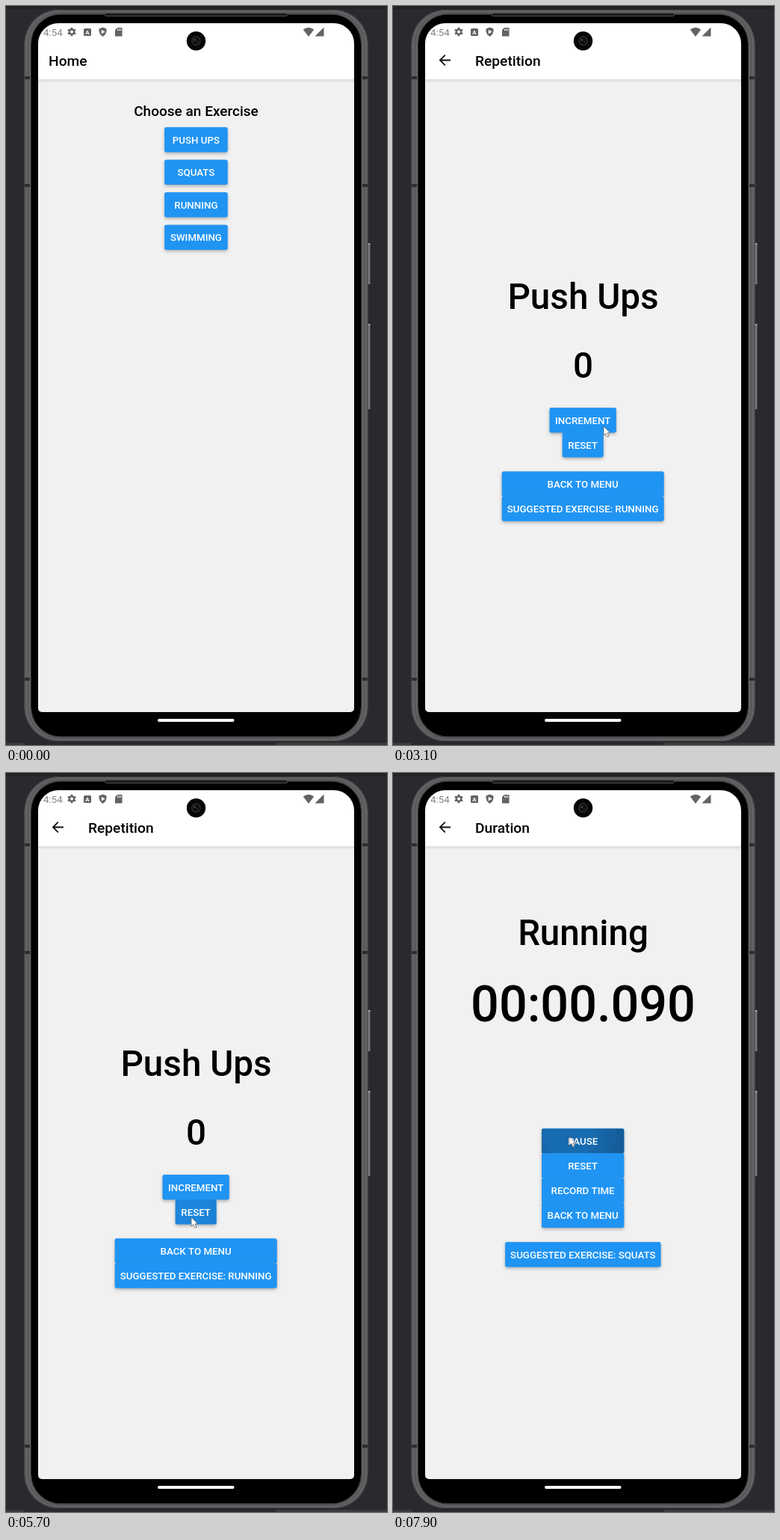
An HTML page with a canvas for the animation above (8000 ms loop, 510 px wide and 988 px high).

```html
<!DOCTYPE html>
<html lang="en">
<head>
<meta charset="utf-8">
<title>Exercise app</title>
<style>
html, body { margin: 0; width: 100%; height: 100%; overflow: hidden; background: #292a2d; }
canvas { display: block; width: 510px; height: 988px; }
</style>
</head>
<body>
<canvas id="stage" width="510" height="988"></canvas>
<script>
const ctx = document.getElementById('stage').getContext('2d');
const LOOP = 8000, STEP = 100, SLIDE = 450, MID = 254.5;
const BLUE = '#2094f3', PAPER = '#f1f1f1';
const SCREEN = { x: 43, y: 23, w: 423, h: 921 };

const button = (label, x, y, w) => ({ label, x, y, w, h: 33 });
const home = ['PUSH UPS', 'SQUATS', 'RUNNING', 'SWIMMING']
  .map((label, i) => button(label, 212.3, 162.2 + i * 43.5, 84.2));
const repetition = [
  button('INCREMENT', 209.7, 537.2, 88.9),
  button('RESET', 226.8, 570.2, 54.7),
  button('BACK TO MENU', 145.8, 622.4, 216.7),
  button('SUGGESTED EXERCISE: RUNNING', 145.8, 655.4, 216.7)
];
const duration = ['START', 'RESET', 'RECORD TIME', 'BACK TO MENU']
  .map((label, i) => button(label, 199, 475.5 + i * 33.1, 110.2));
duration.push(button('SUGGESTED EXERCISE: SQUATS', 150.3, 627.2, 208));

const press = (time, target) => ({ time, target });
const counts = [3500, 3750, 4000, 4300, 4600, 4850];
const RESET_AT = 5400, START_AT = 7800;
const presses = [
  press(1700, home[0]),
  ...counts.map(time => press(time, repetition[0])),
  press(RESET_AT, repetition[1]),
  press(6700, repetition[3]),
  press(START_AT, duration[0])
];

// time, x, y of the pointer tip
const pointer = [
  [800, 478, 240], [1200, 383, 187], [1400, 249, 176], [2100, 249, 176],
  [2500, 290, 262], [3000, 282, 562], [3100, 282, 562], [3400, 267, 549],
  [5000, 267, 549], [5400, 245, 583], [5500, 245, 584], [5700, 248, 594],
  [6100, 190, 668], [6500, 200, 668], [6800, 225, 660], [7000, 273, 552],
  [7500, 236, 486], [8000, 236, 486]
];

const clamp = v => Math.max(0, Math.min(1, v));
const cubic = (a, b, c, d, u) => {
  const v = 1 - u;
  return v * v * v * a + 3 * v * v * u * b + 3 * v * u * u * c + u * u * u * d;
};

// fast out, extra slow in
function ease(p) {
  if (p >= 1) return 1;
  const [xs, ys] = p < 1 / 6
    ? [[0, 0.05, 0.1333, 1 / 6], [0, 0, 0.06, 0.4]]
    : [[1 / 6, 0.2083, 0.25, 1], [0.4, 0.82, 1, 1]];
  let lo = 0, hi = 1;
  for (let i = 0; i < 24; i++) {
    const mid = (lo + hi) / 2;
    if (cubic(...xs, mid) < p) lo = mid; else hi = mid;
  }
  return cubic(...ys, lo);
}

function box(x, y, w, h, r, fill) {
  ctx.beginPath();
  ctx.roundRect(x, y, w, h, r);
  if (fill) {
    ctx.fillStyle = fill;
    ctx.fill();
  }
}

function outline(x, y, w, h, r, color, width) {
  box(x, y, w, h, r);
  ctx.strokeStyle = color;
  ctx.lineWidth = width;
  ctx.stroke();
}

function disc(x, y, r, fill) {
  ctx.beginPath();
  ctx.arc(x, y, r, 0, Math.PI * 2);
  ctx.fillStyle = fill;
  ctx.fill();
}

function poly(points, fill) {
  ctx.beginPath();
  points.forEach(([x, y]) => ctx.lineTo(x, y));
  ctx.closePath();
  ctx.fillStyle = fill;
  ctx.fill();
}

function text(str, x, y, size, align = 'center', color = '#000', weight = 500) {
  ctx.font = `${weight} ${size}px Roboto, sans-serif`;
  ctx.textAlign = align;
  ctx.fillStyle = color;
  ctx.fillText(str, x, y);
}

function drawPhone() {
  ctx.fillStyle = '#292a2d';
  ctx.fillRect(0, 0, 510, 988);
  ctx.fillStyle = '#222326';
  ctx.fillRect(0, 0, 510, 4);
  ctx.fillStyle = '#3a3b3d';
  ctx.fillRect(0, 985, 25, 3);
  ctx.fillRect(362, 985, 148, 3);

  for (const [y, h] of [[317, 55], [425, 114]]) {
    box(483, y, 5, h, 1, '#77787a');
    ctx.fillStyle = '#a2a3a4';
    ctx.fillRect(484, y, 3, 2);
    ctx.fillStyle = '#4a4b4c';
    ctx.fillRect(487, y + 2, 1, h - 2);
  }
  box(24.5, 5, 460, 978, 46, '#626364');
  outline(25, 5.5, 459, 977, 46, '#46474a', 1);
  outline(29.5, 9, 450, 970, 42, '#575859', 2);
  box(34, 11.5, 441, 965, 39, '#000');
  outline(33.5, 11, 442, 966, 39, '#2c2c2c', 1);
  ctx.fillStyle = '#2b2c2d';
  for (const y of [94, 238, 898]) {
    ctx.fillRect(25, y, 7, 4);
    ctx.fillRect(477, y, 7, 4);
  }
  box(132, 10, 245, 4, 2, '#1a1a1a');
  outline(132.5, 9.5, 244, 4, 2, '#4d4d4d', 1);
  box(203, 953, 102.5, 4, 2, '#fff');
}

function drawStatus() {
  const gray = '#636363';
  text('4:54', 50, 39.5, 13.3, 'left', '#858585', 400);

  ctx.strokeStyle = gray;
  ctx.lineWidth = 2.6;
  for (let i = 0; i < 3; i++) {
    const a = Math.PI / 6 + i * Math.PI / 3;
    const dx = Math.cos(a) * 5.8, dy = Math.sin(a) * 5.8;
    ctx.beginPath();
    ctx.moveTo(88 - dx, 34.5 - dy);
    ctx.lineTo(88 + dx, 34.5 + dy);
    ctx.stroke();
  }
  disc(88, 34.5, 4.4, gray);
  disc(88, 34.5, 2, '#fff');

  box(104, 30, 10, 10, 1.5, gray);
  text('A', 109, 38, 8, 'center', '#fff', 700);

  poly([[129.5, 28.5], [134.5, 30.5], [134.5, 34], [133, 38], [129.5, 41],
    [126, 38], [124.5, 34], [124.5, 30.5]], gray);
  poly([[127.8, 31.8], [132.6, 34.6], [127.8, 37.4]], '#fff');

  poly([[149, 29], [155.5, 29], [155.5, 40.5], [146, 40.5], [146, 32]], gray);
  ctx.fillStyle = '#fff';
  for (let i = 0; i < 3; i++) ctx.fillRect(149 + i * 2, 30.5, 1, 2.5);

  ctx.beginPath();
  ctx.moveTo(405, 41);
  ctx.lineTo(397.8, 31.5);
  ctx.quadraticCurveTo(405, 26, 412.2, 31.5);
  ctx.fillStyle = gray;
  ctx.fill();
  poly([[425.5, 28.5], [425.5, 40.5], [413.5, 40.5]], gray);
}

function drawCamera() {
  disc(MID, 46.7, 12.7, '#060606');
  disc(MID, 46.7, 6.6, '#252628');
  disc(MID, 46.7, 4.6, '#0d0e10');
  disc(252.8, 45.3, 1.6, '#3b3d40');
  disc(256, 48, 1, '#303236');
}

function drawRipples(b, t) {
  for (const { time, target } of presses) {
    const age = t - time;
    if (target !== b || age < 0 || age >= 400) continue;
    const alpha = age < 100 ? 0.2 + age * 0.0016 : 0.36 * (1 - (age - 100) / 300);
    const [x, y] = pointerAt(time);
    const glow = ctx.createRadialGradient(x, y, 4, x, y, b.w * 0.7);
    glow.addColorStop(0, `rgba(0,0,0,${alpha * 0.8})`);
    glow.addColorStop(0.3, `rgba(0,0,0,${alpha * 0.75})`);
    glow.addColorStop(1, `rgba(0,0,0,${alpha * 1.1})`);
    box(b.x, b.y, b.w, b.h, 2, glow);
  }
}

function drawButtons(list, t) {
  ctx.save();
  ctx.shadowColor = 'rgba(0,0,0,.3)';
  ctx.shadowBlur = 4;
  ctx.shadowOffsetY = 2;
  for (const b of list) box(b.x, b.y, b.w, b.h, 2, BLUE);
  ctx.restore();
  for (const b of list) {
    box(b.x, b.y, b.w, b.h, 2, BLUE);
    drawRipples(b, t);
    const label = b === duration[0] && t > START_AT ? 'PAUSE' : b.label;
    text(label, b.x + b.w / 2, b.y + 21.6, 13.3, 'center', '#fff');
  }
}

function drawArrow() {
  ctx.strokeStyle = '#111';
  ctx.lineWidth = 1.8;
  ctx.beginPath();
  ctx.moveTo(77, 72.5);
  ctx.lineTo(63.2, 72.5);
  ctx.moveTo(69.8, 65.6);
  ctx.lineTo(62.9, 72.5);
  ctx.lineTo(69.8, 79.4);
  ctx.stroke();
}

function drawBase(title, back) {
  ctx.fillStyle = PAPER;
  ctx.fillRect(-20, 98, 550, 850);
  const shade = ctx.createLinearGradient(0, 98, 0, 103);
  shade.addColorStop(0, '#d9d9d9');
  shade.addColorStop(1, PAPER);
  ctx.fillStyle = shade;
  ctx.fillRect(-20, 98, 550, 5);
  ctx.fillStyle = '#fff';
  ctx.fillRect(-20, 20, 550, 78);
  if (back) drawArrow();
  text(title, back ? 110 : 57, 79.5, 19.2, 'left');
}

function drawHome(t) {
  drawBase('Home', false);
  text('Choose an Exercise', MID, 147, 19);
  drawButtons(home, t);
}

function drawRepetition(t) {
  const total = t >= RESET_AT + 100 ? 0 : counts.filter(c => t >= c + 100).length;
  drawBase('Repetition', true);
  text('Push Ups', MID, 404.5, 47.6);
  text(total, MID, 496.5, 47.6);
  drawButtons(repetition, t);
}

function drawDuration(t) {
  const ms = Math.max(0, t - START_AT - 10);
  drawBase('Duration', true);
  text('Running', MID, 230, 47.6);
  text('00:00.' + String(ms).padStart(3, '0'), MID, 331.5, 66.5);
  drawButtons(duration, t);
}

const pages = [
  { at: -LOOP, draw: drawHome },
  { at: 1850, draw: drawRepetition },
  { at: 6825, draw: drawDuration }
];

function drawPage(page, t, dx, alpha) {
  ctx.save();
  ctx.globalAlpha = alpha;
  ctx.translate(dx, 0);
  page.draw(t);
  ctx.restore();
}

function drawScreen(t) {
  const { x, y, w, h } = SCREEN;
  const i = pages.filter(p => t >= p.at).length - 1;
  const age = t - pages[i].at;
  const p = ease(age / SLIDE);
  const shift = w / 10;
  ctx.save();
  box(x, y, w, h, [27, 27, 5, 5]);
  ctx.clip();
  if (age < SLIDE) drawPage(pages[i - 1], t, -shift * p, 1);
  drawPage(pages[i], t, shift * (1 - p), clamp((age - 50) / 83));
  drawStatus();
  ctx.restore();
}

function pointerAt(t) {
  const i = Math.max(1, pointer.findIndex(k => k[0] > t));
  const [t0, x0, y0] = pointer[i - 1], [t1, x1, y1] = pointer[i];
  const u = clamp((t - t0) / (t1 - t0));
  const s = u * u * (3 - 2 * u);
  return [x0 + (x1 - x0) * s, y0 + (y1 - y0) * s];
}

function drawPointer(t) {
  if (t < pointer[0][0]) return;
  ctx.save();
  ctx.translate(...pointerAt(t));
  poly([[0, 0], [0, 12], [2.8, 9.5], [4.9, 14.2], [7, 13.2], [5, 8.8], [8.7, 8.5]], '#fff');
  ctx.strokeStyle = 'rgba(60,60,60,.75)';
  ctx.lineWidth = 0.8;
  ctx.stroke();
  ctx.restore();
}

function frame(now) {
  const t = Math.floor((now % LOOP) / STEP) * STEP;
  drawPhone();
  drawScreen(t);
  drawCamera();
  drawPointer(t);
  requestAnimationFrame(frame);
}

requestAnimationFrame(frame);
</script>
</body>
</html>
```
